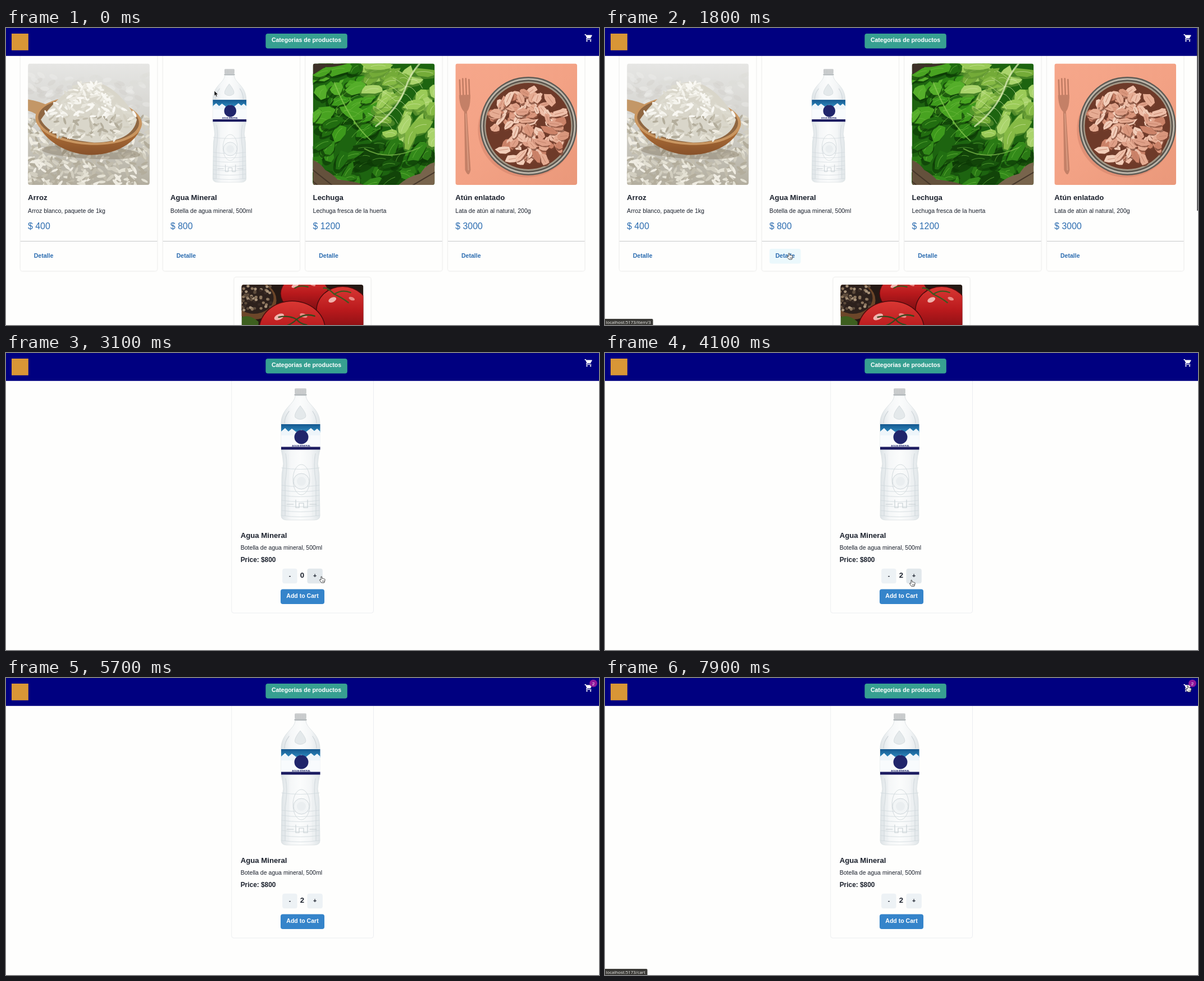
An HTML page that plays this animation: 1056x530 px, repeating every 8 s.

```html
<!DOCTYPE html>
<html lang="es">
<head>
<meta charset="utf-8">
<title>Tienda</title>
<style>
html, body { margin: 0; width: 100%; height: 100%; overflow: hidden; background: #fefefd; }
svg { display: block; }
text { font-family: "Liberation Sans", Arial, sans-serif; white-space: pre; }
.card { fill: #fefefd; filter: drop-shadow(0 .7px 1px rgba(0, 0, 0, .17)); }
.status { font-family: "Open Sans", "Noto Sans", sans-serif; }
</style>
</head>
<body>
<svg id="stage" width="1056" height="530" viewBox="0 0 1056 530"></svg>
<script>
const LOOP = 8000, STEP = 100;
const INK = '#1a202c', BLUE = '#2b6cb0';

let seed = 1;
const rnd = (a = 0, b = 1) => {
  seed = (seed * 1664525 + 1013904223) % 4294967296;
  return a + (b - a) * seed / 4294967296;
};
const pick = list => list[Math.floor(rnd(0, list.length))];
const times = (n, make) => Array.from({ length: n }, (_, i) => make(i)).join('');

// Markup helpers
const rect = (x, y, w, h, fill, r = 0, more = '') =>
  `<rect x="${x}" y="${y}" width="${w}" height="${h}" rx="${r}" fill="${fill}" ${more}/>`;
const oval = (x, y, rx, ry, fill, turn = 0, more = '') =>
  `<ellipse cx="${x}" cy="${y}" rx="${rx}" ry="${ry}" fill="${fill}" transform="rotate(${turn} ${x} ${y})" ${more}/>`;
const path = (d, fill, more = '') => `<path d="${d}" fill="${fill}" ${more}/>`;
const line = (d, color, width, more = '') =>
  path(d, 'none', `stroke="${color}" stroke-width="${width}" stroke-linecap="round" ${more}`);
const text = (x, y, size, str, fill = INK, more = '') =>
  `<text x="${x}" y="${y}" font-size="${size}" fill="${fill}" ${more}>${str}</text>`;
const bold = 'font-weight="700"';
const mid = 'text-anchor="middle"';
const boldMid = `${bold} ${mid}`;
const gradient = (id, stops, x2 = 0, y2 = 1) =>
  `<linearGradient id="${id}" x2="${x2}" y2="${y2}">` + stops.map((c, i) =>
    `<stop offset="${i / (stops.length - 1)}" stop-color="${c}"/>`).join('') + '</linearGradient>';

function blob(x, y, rx, ry, turn, fill, more = '') {
  const pts = times(9, i => {
    const a = i * Math.PI * 2 / 9, k = rnd(.7, 1.15);
    return `${(x + rx * k * Math.cos(a)).toFixed(1)},${(y + ry * k * Math.sin(a)).toFixed(1)} `;
  });
  return `<polygon points="${pts}" fill="${fill}" stroke-linejoin="round" transform="rotate(${turn} ${x} ${y})" ${more}/>`;
}

const picture = (x, y, body) =>
  `<g transform="translate(${x} ${y})" clip-path="url(#frame)">${body}</g>`;

// Product pictures, each 216.7 units square
function rice() {
  seed = 7;
  const bright = ['#f5f4ee', '#eae8df', '#dddbd0', '#f9f8f3'];
  const shaded = ['#e4e1d4', '#d2cec0', '#c2bdad', '#efece2', '#b3ad9c'];
  const grain = (x, y, size, tones) => oval(x, y, size, size * .33, pick(tones), rnd(-80, 80));
  return rect(0, 0, 217, 217, 'url(#riceBg)') +
    times(110, () => oval(rnd(0, 217), rnd(20, 95), 8, 4, pick(['#eeedea', '#cfcec9', '#dcdbd6']), rnd(-40, 40), 'opacity=".4"')) +
    times(420, i => grain(rnd(0, 217), 95 + 125 * i / 420 + rnd(-6, 6), rnd(6, 9), shaded)) +
    oval(112, 158, 88, 12, '#7d705a', 3, 'opacity=".4"') +
    path('M0 64Q18 66 44 78L28 102Q16 88 0 84Z', '#c39767') +
    path('M14 90C18 134 68 163 114 163C164 162 200 134 203 106Q150 130 100 128Q40 122 14 90Z', 'url(#wood)') +
    oval(108, 102, 95, 43, '#c99661', 4) + oval(108, 101, 90, 40, '#8f6742', 4) +
    path('M23 100C38 78 66 46 98 35C138 24 172 60 194 100Q186 140 118 141Q40 134 23 100Z', '#d9d6ca') +
    times(230, () => {
      const y = rnd(36, 134), half = y > 106 ? 82 - (y - 106) * 1.1 : Math.min(82, 18 + (y - 36) * 1.2);
      return grain(108 + rnd(-half, half), y, rnd(5, 8), y > 95 ? shaded : bright);
    });
}

function lettuce() {
  seed = 21;
  const light = ['#9bcb58', '#86ba45', '#aad46c', '#74ab38'];
  const fresh = ['#3d9a1c', '#55ae2a', '#2d8315', '#48a321', '#216d10'];
  const deep = ['#216e12', '#18550d', '#338a1a', '#2a7a15', '#124409'];
  const tone = (x, y) => y > 140 ? deep : x - y * .35 > 88 ? light : fresh;
  const rib = (d, w, color) => line(d, color, w, 'opacity=".75"');
  const veins = (x, y, dx, dy, color) => times(7, i => {
    const px = x + dx * i / 7, py = y + dy * i / 7;
    return rib(`M${px} ${py}q${-dy * .08 + 6} ${dx * .08 - 8} ${-dy * .25} ${dx * .25}`, 1, color) +
      rib(`M${px} ${py}q${dy * .08 - 4} ${-dx * .08 - 6} ${dy * .25} ${-dx * .25}`, 1, color);
  });
  // A ruffle is a leaf lobe with the shadow it casts and a vein
  const ruffle = () => {
    const x = rnd(0, 217), y = rnd(0, 217), rx = rnd(12, 27), ry = rnd(7, 13);
    const turn = rnd(-75, 15), tones = tone(x, y), isLight = tones === light;
    return oval(x - 2, y + 4, rx, ry, isLight ? '#5c9330' : '#0c3806', turn, 'opacity=".65"') +
      blob(x, y, rx, ry, turn, pick(tones)) +
      line(`M${x - rx * .6} ${y}q${rx * .6} -4 ${rx * 1.1} 1`, isLight ? '#cfe7a2' : '#6fbd41', .9,
        `transform="rotate(${turn} ${x} ${y})" opacity=".7"`);
  };
  return rect(0, 0, 217, 217, '#1d6410') + times(150, ruffle) +
    rib('M112 112Q150 82 164 46Q172 20 190 0', 3, '#dcedb8') + veins(120, 104, 62, -88, '#cfe6a5') +
    rib('M104 138Q66 105 38 34', 2, '#8aca52') + veins(98, 130, -54, -84, '#6fba3f') +
    rib('M92 152Q134 176 190 150', 2, '#7cba4a') +
    path('M0 0H62Q34 8 22 6Q10 14 0 20Z', '#3d3128') +
    path('M0 172Q14 178 22 190Q34 196 44 207Q76 210 92 217H0Z', '#64513c') +
    path('M217 176Q200 180 192 196Q168 202 152 217H217Z', '#78644c') +
    line('M0 190L34 217M8 217L0 210M178 217L217 194', '#46372a', 2);
}

function tuna() {
  seed = 5;
  const flesh = ['#e6ac93', '#d9967c', '#efbfa9', '#cb8268', '#f2cdb9', '#dfa088'];
  return rect(0, 0, 217, 217, 'url(#peach)') +
    `<g transform="rotate(-2 18 100)">` +
    line('M10 29V62M15.5 27V62M21 27V62M26.5 29V62', '#c17c63', 2.6) +
    path('M8 56H28Q28 78 21 86L24 190Q20 206 14 190L16 86Q8 78 8 56Z', '#c48067') +
    line('M19 90L20 190', '#d99a80', 2) + '</g>' +
    oval(127, 118, 87, 85, '#c0705a', 0, 'opacity=".35"') +
    oval(130, 111.5, 86.5, 88, '#5f5b55') + oval(130, 111.5, 84, 85.5, '#bcb5a9') +
    oval(130, 111.5, 81, 82.5, '#57514a') + oval(130, 111.5, 78.5, 80, '#a39786') +
    oval(130, 111.5, 76, 77, '#6e3a29') +
    times(125, () => {
      const a = rnd(0, 6.283), r = 66 * Math.sqrt(rnd()), turn = rnd(-80, 80);
      const x = 130 + r * Math.cos(a), y = 111.5 + r * Math.sin(a), rx = rnd(7, 17), ry = rnd(4, 9);
      return oval(x + 1, y + 2.5, rx * .9, ry * .9, '#7a4230', turn, 'opacity=".7"') +
        blob(x, y, rx, ry, turn, pick(flesh)) +
        line(`M${x - rx * .5} ${y}h${rx}`, '#c07e66', .8, `transform="rotate(${turn} ${x} ${y})"`);
    });
}

function tomatoes() {
  seed = 12;
  const tomato = (x, y, rx, ry) => oval(x, y, rx + 1.5, ry + 1.5, '#4d0a0c') + oval(x, y, rx, ry, 'url(#red)') +
    oval(x - rx * .4, y - ry * .45, rx * .16, ry * .1, '#f8cdc6', -25, 'opacity=".85"') +
    oval(x + rx * .35, y - ry * .5, rx * .12, ry * .07, '#f3a79e', 20, 'opacity=".8"');
  return rect(0, 0, 217, 217, '#251914') +
    oval(22, 28, 40, 34, '#6c4629') + oval(22, 24, 35, 28, '#2d211c') +
    times(70, () => oval(rnd(-8, 52), rnd(2, 46), 2.6, 2.4, pick(['#5e4c3c', '#8c765e', '#392b25', '#a8937a']))) +
    tomato(112, 16, 42, 32) + tomato(180, 46, 46, 42) + tomato(90, 80, 58, 50) +
    line('M98 62Q84 54 66 58M98 62Q112 50 130 56M98 62Q90 70 78 74M98 62Q104 70 116 72', '#35491d', 2.4) +
    line('M165 17Q178 8 194 14M165 17Q152 4 146 6M165 17Q180 24 190 32M118 4Q104 0 95 6', '#40561f', 2.4) +
    path('M0 58Q14 52 30 66V80H0Z', '#3d5f1f');
}

function bottle() {
  const ridge = y => line(`M491 ${y}Q524 ${y + 5} 558 ${y}`, '#d0d8dc', .8);
  return path('M515 76C514 92 490 98 490 126V172Q493 184 494 198Q490 216 491 236L490 290Q490 298 500 298H549Q559 298 559 290L558 236Q559 216 555 198Q556 184 559 172V126C559 98 535 92 534 76Z',
      'url(#glass)', 'stroke="#d3dadd" stroke-width=".7"') +
    rect(514, 63, 21, 10, '#d0d2d3', 2) + rect(513.5, 73, 22, 3, '#b8bdbf', 1) +
    times(7, i => line(`M${516 + i * 2.8} 65V72`, '#b0b4b6', .6)) +
    path('M524 94Q537 110 533 115Q524 122 515 115Q512 109 524 94Z', '#e4e9eb', 'stroke="#ccd3d7" stroke-width=".7"') +
    line('M504 104Q496 114 496 125M546 104Q553 114 553 125', '#cfd6da', 1.3) +
    rect(490, 127, 69.5, 46, '#f8fbfd') + rect(490, 127, 69.5, 15, 'url(#sky)') +
    path('M490 147V140L497 134L503 140L509 135L517 141L526 137L534 141L543 134L549 139L554 135L559.5 140V147Z', '#eef5fa') +
    rect(490, 167.5, 69.5, 5, '#1b1b60') +
    oval(526, 150, 12.5, 12.5, '#20256b') +
    text(526, 166.6, 4.3, 'AGUA MINERAL', '#20256b', boldMid) +
    line('M498 180Q502 200 497 230V290M551 180Q547 200 552 230V290', '#dbe1e4', 2) +
    line('M503 181V290M546 181V290', '#e9edef', 1) +
    [205, 236, 245, 254, 263, 272, 281, 290].map(ridge).join('') +
    oval(526, 226, 15, 27, 'none', 0, 'stroke="#d4dbde"') +
    oval(526, 229, 14, 14, '#f2f5f6', 0, 'stroke="#cfd6da"') + oval(526, 229, 8, 8, '#eaeef0') +
    line('M516 262V276H522V268H530V276H537V262M500 270H512M541 270H553', '#c5ced2', 1.1);
}

// Pages
const PITCH = 253.75;
function productCard(i, name, info, price, image) {
  const x = 25.8 + PITCH * i, tx = x + 13.3;
  return rect(x, 30, 243.4, 403.5, '', 4, 'class="card"') + image(x + 13.3) +
    text(tx, 307, 13.2, name, INK, bold) + text(tx, 329.7, 10.56, info) +
    text(tx, 358.9, 15.84, '$ ' + price, BLUE) +
    rect(x, 380, 243.4, .8, '#b9bbbd') +
    (i === 1 ? rect(tx, 394, 55.7, 26.4, '#ebf8fc', 4, 'id="detailHover"') : '') +
    text(tx + 10.6, 409.7, 10.56, 'Detalle', BLUE, bold);
}

const listPage =
  productCard(0, 'Arroz', 'Arroz blanco, paquete de 1kg', 400, x => picture(x, 63.4, rice())) +
  productCard(1, 'Agua Mineral', 'Botella de agua mineral, 500ml', 800,
    () => `<g transform="translate(-53.1 18.9) scale(.86)">${bottle()}</g>`) +
  productCard(2, 'Lechuga', 'Lechuga fresca de la huerta', 1200, x => picture(x, 63.4, lettuce())) +
  productCard(3, 'Atún enlatado', 'Lata de atún al natural, 200g', 3000, x => picture(x, 63.4, tuna())) +
  rect(406.3, 445, 243.4, 120, '', 4, 'class="card"') + picture(419.6, 458, tomatoes());

const detailPage =
  rect(401.7, 30, 252.8, 434, '#fefefd', 4, 'stroke="#e6e9ec" stroke-width=".8"') + bottle() +
  text(417.7, 330.3, 13.2, 'Agua Mineral', INK, bold) +
  text(417.7, 350.9, 10.56, 'Botella de agua mineral, 500ml') +
  text(417.7, 373.3, 11.88, 'Price: $800', INK, bold) +
  rect(492.2, 384.8, 26.4, 26.4, '#edf2f5', 4) + text(505.4, 400.6, 10.56, '-', INK, boldMid) +
  text(527.5, 401.1, 13.2, '0', INK, `${boldMid} id="count"`) +
  rect(536.4, 384.8, 27.4, 26.4, '', 4, 'id="plus"') + text(550.1, 401, 10.56, '+', INK, boldMid) +
  rect(489, 421.5, 78, 26.4, '', 4, 'id="add"') + text(528, 437.2, 10.56, 'Add to Cart', '#fff', boldMid);

const cart = 'M7 18a2 2 0 1 0 0 4a2 2 0 0 0 0-4zM1 2v2h2l3.6 7.59-1.35 2.45c-.16.28-.25.61-.25.96 0 1.1.9 2 2 2h12v-2H7.42c-.14 0-.25-.11-.25-.25l.03-.12.9-1.63h7.45c.75 0 1.41-.41 1.75-1.03l3.58-6.49c.08-.14.12-.31.12-.48 0-.55-.45-1-1-1H5.21l-.94-2H1zM17 18a2 2 0 1 0 0 4a2 2 0 0 0 0-4z';

const header = rect(0, 0, 1056, 49.8, '#000080') + rect(10, 10, 29.8, 29.8, '#d99636') +
  rect(462.4, 10, 145.4, 26.4, '#37a091', 4) +
  text(535, 25.4, 10.56, 'Categorias de productos', '#fff', boldMid) +
  path(cart, '#fff', 'transform="translate(1029.8 9.8) scale(.66)"') +
  `<g id="badge">${oval(0, 0, 6.9, 6.7, '#90169a')}${text(0, 2.9, 8, '2', '#fff', mid)}</g>`;

const pointer =
  path('M0 0V9.2L2.1 7.3L3.6 10.7L5.2 10L3.8 6.7H6.7Z', '#111', 'id="arrow" stroke="#fff" stroke-width=".6"') +
  path('M1-1Q2-1.5 2.6-.6L3.2 2.6Q4.2 1.9 4.9 2.8Q6 2.2 6.6 3.2Q8 2.9 8.2 4.2L7.6 7.5L6.6 10H1.8L-1.6 5.4Q-2 4 .2 4.6L1 5Z',
    '#fff', 'id="hand" stroke="#222" stroke-width=".8" stroke-linejoin="round"') +
  line('M3.6 6V8.4M5 6V8.4M6.3 6V8.4', '#333', .5, 'id="knuckles"');

document.getElementById('stage').innerHTML = '<defs>' +
  '<clipPath id="frame"><rect width="216.7" height="216.7" rx="4"/></clipPath>' +
  gradient('riceBg', ['#e6e6e4', '#d2d1cc', '#b3ae9f']) + gradient('wood', ['#c58850', '#a96b35', '#87512a']) +
  gradient('peach', ['#f6a78b', '#f3a285', '#ea987a'], 1) + gradient('red', ['#d93733', '#b8191c', '#7c0d12']) +
  gradient('sky', ['#14578f', '#2f8cc0']) +
  gradient('glass', ['#dde3e6', '#f5f7f8', '#fbfcfc', '#f4f6f7', '#dfe5e8'], 1, 0) + '</defs>' +
  rect(0, 0, 1056, 530, '#fefefd') +
  `<g id="list">${listPage}</g><g id="detail">${detailPage}</g>${header}` +
  rect(1054.2, 0, 1.8, 326, '#4c4c50', 0, 'id="scrollbar"') +
  `<g id="status">${rect(-3, 519, 0, 14, '#3b3a37', 2, 'id="statusBox"')}${text(1.6, 528, 7.9, '', '#f1f1ee', 'class="status" id="url"')}</g>` +
  `<g id="pointer">${pointer}</g>`;

const el = Object.fromEntries([...document.querySelectorAll('[id]')].map(n => [n.id, n]));
const show = (node, on) => node.setAttribute('display', on ? 'inline' : 'none');
const fill = (node, color) => node.setAttribute('fill', color);

// Pointer route: time, x, y
const route = [
  [0, 371, 112], [400, 371, 112], [500, 363, 180], [600, 352, 265], [700, 352, 265], [800, 328, 341],
  [900, 328, 341], [1300, 327, 398], [1500, 326, 403], [2200, 326, 403], [2300, 329, 403], [2500, 329, 403],
  [2600, 350, 408], [2800, 480, 430], [2900, 548, 424], [3000, 583, 406], [3100, 560, 400], [3400, 544, 395],
  [3500, 542, 395], [4000, 542, 395], [4300, 548, 429], [5300, 548, 429], [5400, 620, 396], [5500, 1013, 232],
  [5600, 1013, 232], [5700, 1030, -20], [6100, 1030, -20], [6200, 1028, 2], [6400, 974, 19], [6900, 1033, 7],
  [7000, 1034, 9], [7200, 1038, 15], [7900, 1036, 15]
];

function pointerAt(t) {
  const i = Math.max(1, route.findIndex(k => k[0] >= t));
  const [t0, x0, y0] = route[i - 1], [t1, x1, y1] = route[i];
  const k = (t - t0) / (t1 - t0);
  return [x0 + (x1 - x0) * k, y0 + (y1 - y0) * k];
}

function render(now) {
  const t = Math.floor(now % LOOP / STEP) * STEP;
  const between = (a, b) => t >= a && t < b;
  const [x, y] = pointerAt(t);
  const over = (l, top, r, b) => x >= l && x <= r && y >= top && y <= b;
  const onList = t < 1900, onDetail = t >= 2100;
  const onLink = onList && over(293, 394, 349, 420);
  const onPlus = onDetail && over(536, 385, 564, 411);
  const onAdd = onDetail && over(489, 421, 567, 448);
  const onCart = over(1030, 10, 1046, 26);

  show(el.list, onList);
  show(el.detail, onDetail);
  show(el.scrollbar, between(500, 1900));
  show(el.detailHover, onLink);

  el.count.textContent = t < 3800 ? 0 : t < 4000 ? 1 : 2;
  fill(el.plus, t === 3700 || t === 3900 ? '#cbd5e0' : onPlus ? '#e2e8ec' : '#edf2f5');
  fill(el.add, between(4500, 4700) ? '#2c5282' : onAdd ? BLUE : '#3584ca');

  const grow = Math.min(1, Math.max(0, (t - 4500) / 300));
  el.badge.setAttribute('transform', `translate(1046 9.6) scale(${1 - (1 - grow) ** 2})`);

  const url = between(1400, 2100) ? 'item/3' : t >= 7400 ? 'cart' : '';
  show(el.status, url);
  el.url.textContent = 'localhost:5173/' + url;
  el.statusBox.setAttribute('width', url === 'cart' ? 78.5 : 88.5);

  const hand = onLink || onPlus || onAdd || onCart;
  show(el.arrow, !hand);
  show(el.hand, hand);
  show(el.knuckles, hand);
  el.pointer.setAttribute('transform', `translate(${x} ${y})`);
}

const start = performance.now();
function tick() {
  render(performance.now() - start);
  requestAnimationFrame(tick);
}
tick();
</script>
</body>
</html>
```
